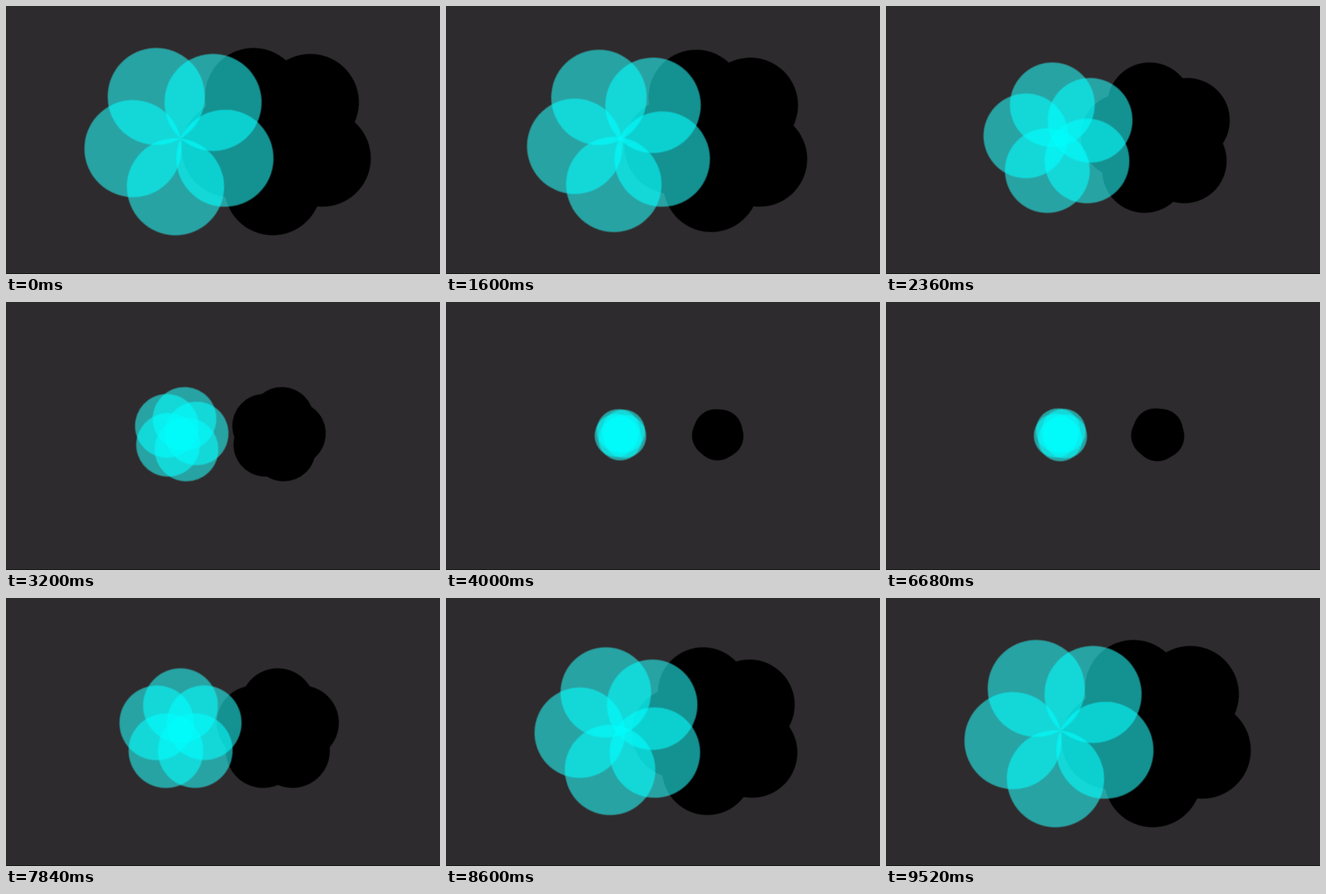
Animation of 600x371 px, one loop 9.8 s. Source, as an HTML page:

```html
<!DOCTYPE html>
<html lang="en">
<head>
<meta charset="utf-8">
<title>Breathing flower</title>
<style>
  html, body { margin: 0; width: 100%; height: 100%; overflow: hidden; background: #2d2b2d; }
  svg { display: block; width: 100%; height: 100%; }
  .petal {
    --open: rotate(var(--angle)) scale(1) translateX(67.2px);
    --closed: rotate(calc(var(--angle) + 90deg)) scale(.3) translateX(0px);
    transform: var(--open);
    animation: breathe 9.8s infinite;
  }
  .flower .petal { fill: #0ff; fill-opacity: .57; }
  /* 1120 ms rest, 4200 ms in, 4200 ms out, 280 ms rest */
  @keyframes breathe {
    0% { transform: var(--open); animation-timing-function: linear; }
    11.42857% { transform: var(--open); animation-timing-function: ease-in-out; }
    54.28571% { transform: var(--closed); animation-timing-function: ease-in-out; }
    97.14286%, 100% { transform: var(--open); }
  }
</style>
</head>
<body>
<svg viewBox="0 0 600 371" preserveAspectRatio="none">
  <!-- Thin layers are slightly greyer than dense ones -->
  <filter id="soften" filterUnits="userSpaceOnUse" x="-241" y="-183" width="600" height="371" color-interpolation-filters="sRGB">
    <feColorMatrix values="0 0 0 -.32 .32  0 1 0 0 0  0 0 1 0 0  0 0 0 1 0"/>
  </filter>
  <rect width="600" height="371" fill="#2d2b2d"/>
  <rect y="370" width="600" height="1" fill="#141214"/>
  <g class="shadow" transform="translate(375.8 183.4)"></g>
  <g transform="translate(241.3 183.4)">
    <g class="flower" filter="url(#soften)"></g>
  </g>
</svg>
<script>
  const PETALS = 5;
  for (const group of document.querySelectorAll('.shadow, .flower')) {
    for (let i = 0; i < PETALS; i++) {
      const petal = document.createElementNS('http://www.w3.org/2000/svg', 'circle');
      petal.setAttribute('class', 'petal');
      petal.setAttribute('r', 67.2);
      petal.style.setProperty('--angle', `${24 + i * 360 / PETALS}deg`);
      group.append(petal);
    }
  }
</script>
</body>
</html>
```
